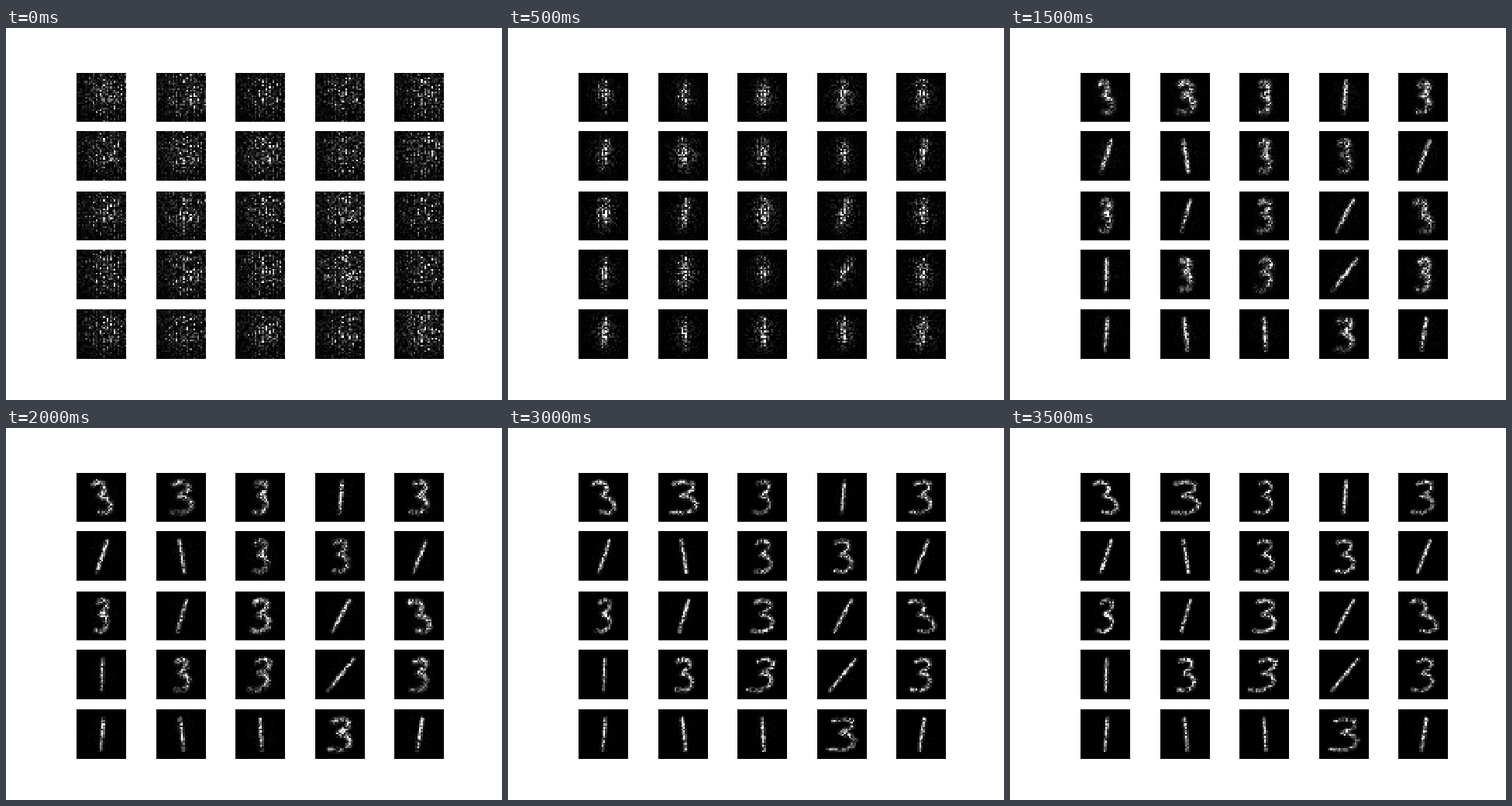
These frames come from a looping animation (640x480 px, 4000 ms). An HTML page with a canvas:

```html
<!DOCTYPE html>
<html>
<head>
<meta charset="utf-8">
<style>
html, body { margin: 0; width: 100%; height: 100%; overflow: hidden; background: #fff; }
canvas { display: block; }
</style>
</head>
<body>
<canvas id="stage" width="640" height="480"></canvas>
<script>
const ctx = document.getElementById('stage').getContext('2d');
const GRID = 28, SIZE = 64, CELL = SIZE / GRID, STEP = 500, STAGES = 8;
const PITCH_X = 102.62, PITCH_Y = 76.5;

// A number is the lean of a one; a pair is the width and lean of a three
const digits = [
  [22, -14], [34, 0], [20, 3], 3, [25, 4],
  13, -6, [21, 0], [23, -1], 16,
  [18, 4], 12, [27, 2], 22, [24, -18],
  1, [22, 0], [28, 12], 33, [24, 4],
  3, -4, -2, [34, 3], 6
];
// Half of the outline of a three in a unit box, from the upper left end
const THREE = [
  [.1, .07], [.45, 0], [.84, .06], [.84, .24], [.4, .46],
  [.8, .51], [1, .67], [.92, .87], [.5, 1], [0, .96]
];

const mix = (a, b, t) => a + (b - a) * t;
const bell = (x, s) => Math.exp(-x * x / (2 * s * s));

function hash(a, b, c) {
  let h = Math.imul(a + 11, 374761393) ^ Math.imul(b + 7, 668265263) ^ Math.imul(c + 3, 2147483589);
  h = Math.imul(h ^ (h >>> 15), 2246822519);
  h = Math.imul(h ^ (h >>> 13), 3266489917);
  return ((h ^ (h >>> 16)) >>> 0) / 4294967296;
}

// Strokes start as a vertical line and open into the digit
function stroke(digit, stage) {
  const isThree = Array.isArray(digit);
  const [width, lean] = isThree ? digit : [0, digit];
  const shape = isThree ? THREE : [[.5, 0], [.5, 1]];
  const pull = 1 - Math.exp(isThree ? -.09 * stage * stage : -stage);
  return shape.map(([u, v]) => [
    33 + pull * ((u - .5) * width + (.5 - v) * lean),
    mix(12.5, 53, v)
  ]);
}

function distance(x, y, points) {
  let best = 99;
  for (let i = 1; i < points.length; i++) {
    const [ax, ay] = points[i - 1], dx = points[i][0] - ax, dy = points[i][1] - ay;
    const t = Math.max(0, Math.min(1, ((x - ax) * dx + (y - ay) * dy) / (dx * dx + dy * dy)));
    best = Math.min(best, Math.hypot(x - ax - t * dx, y - ay - t * dy));
  }
  return best;
}

// Dim noise with bright dashes in every other column
function haze(x, y, stripe, own, shared) {
  const dash = mix(own, shared, .5) ** 4 * stripe;
  return dash * bell(x - 40, 16) * bell(y - 28, 20) + .06 * own * own * bell(y - 24, 24);
}

function shade(tile, stage) {
  const digit = digits[tile], isThree = Array.isArray(digit);
  const points = stroke(digit, stage);
  const spread = 1.4 + 5 * Math.exp(isThree ? -.45 * stage : -stage);
  const contrast = (isThree ? 1.2 : .8) + 1.6 / stage;
  const values = [];
  for (let r = 0; r < GRID; r++) for (let c = 0; c < GRID; c++) {
    const x = (c + .5) * CELL, y = (r + .5) * CELL;
    const own = hash(c, r, tile * STAGES + stage), kept = hash(c, r, 900 + tile), shared = hash(c, r, 999);
    const stripe = c % 2 || stage > 1 ? 1 : .3;
    if (!stage) {
      values.push(haze(x, y, stripe, own, shared));
      continue;
    }
    const grain = mix(own, stage < 3 ? shared : kept, .5) ** contrast;
    const ink = bell(distance(x, y, points), spread) * grain * stripe * bell(y - 28, 9 + 3 * stage);
    const dust = .12 / stage * own ** 4 * bell(x - 34, 14) * bell(y - 30, 16);
    values.push(ink + dust);
  }
  const peak = values.slice().sort((a, b) => b - a)[3];
  return values.map(v => Math.min(1, v / peak));
}

function draw(stage) {
  ctx.fillStyle = '#fff';
  ctx.fillRect(0, 0, 640, 480);
  digits.forEach((_, tile) => {
    const row = tile / 5 | 0;
    const left = Math.round(90.9 + PITCH_X * (tile % 5)), top = Math.floor(57.4 + PITCH_Y * row);
    shade(tile, stage).forEach((v, i) => {
      const c = i % GRID, r = i / GRID | 0, g = Math.round(v * 255);
      const x = Math.round(c * CELL), y = Math.round(r * CELL);
      ctx.fillStyle = `rgb(${g},${g},${g})`;
      ctx.fillRect(left + x, top + y, Math.round((c + 1) * CELL) - x, Math.round((r + 1) * CELL) - y);
    });
    // The first and third rows are cut one pixel short
    ctx.fillStyle = '#fff';
    if (row === 0 || row === 2) ctx.fillRect(left, top, SIZE, 1);
  });
}

let shown = -1, start;
function tick(now) {
  start ??= now;
  const stage = Math.floor((now - start) / STEP) % STAGES;
  if (stage !== shown) draw(shown = stage);
  requestAnimationFrame(tick);
}
requestAnimationFrame(tick);
</script>
</body>
</html>
```
